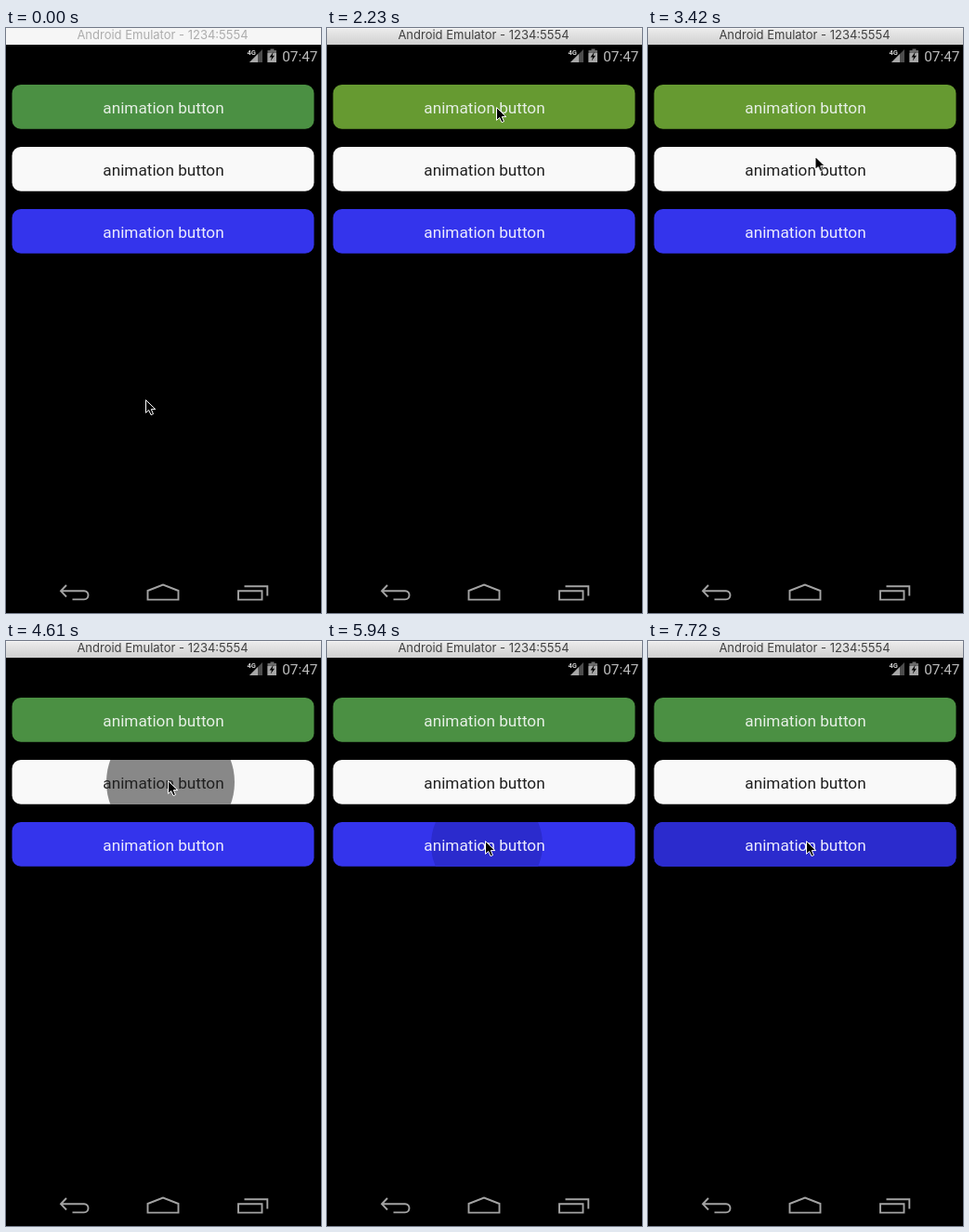
Write an HTML page that moves like this. It is 339 px wide and 630 px high and loops after 8 s.

```html
<!DOCTYPE html>
<html lang="en">
<head>
<meta charset="utf-8">
<title>Animation buttons</title>
<style>
  html, body { margin: 0; width: 100%; height: 100%; overflow: hidden; background: #000; }
  svg { display: block; width: 339px; height: 630px; }
  text { font-family: Roboto, "Noto Sans", sans-serif; }
  .label { font-size: 17.2px; text-anchor: middle; }
  .title { font: 13px Inter, "Open Sans", sans-serif; text-anchor: middle; }
  .clock { font-size: 15.4px; text-anchor: end; fill: #bcbcbc; }
  .net { font-size: 7.5px; font-weight: 700; fill: #d0d0d0; }
  .nav { fill: none; stroke: #a3a3a3; stroke-width: 1.9; }
</style>
</head>
<body>
<svg id="stage" viewBox="0 0 339 630" xmlns="http://www.w3.org/2000/svg">
  <defs>
    <linearGradient id="chrome" x2="0" y2="1">
      <stop offset="0" stop-color="#ebebeb"/>
      <stop offset="1" stop-color="#d0d0d0"/>
    </linearGradient>
  </defs>
  <rect width="339" height="630"/>

  <rect width="339" height="18" fill="#f6f6f6"/>
  <rect id="bar" y="1" width="339" height="17" fill="url(#chrome)"/>
  <text id="title" class="title" x="168.5" y="12">Android Emulator - 1234:5554</text>

  <text class="net" x="259.5" y="29.3">4G</text>
  <path d="M262 37L276 23V37Z" fill="#4c4c4c"/>
  <path d="M262 37L271 28V37Z" fill="#a8a8a8"/>
  <path d="M284.5 22.5h4v1.5h2.5v13h-9.5v-13h3z" fill="#6a6a6a"/>
  <path d="M281.5 27h9.5v10h-9.5z" fill="#a6a6a6"/>
  <path d="M287.8 25.5L283.6 31.4H286L284.8 35.6L289 29.8H286.6Z"/>
  <text class="clock" x="335.5" y="36">07:47</text>

  <g id="buttons"></g>

  <g class="nav">
    <path d="M65 600L59 606.3L65 612.5M59.5 606.3H84C90 606.3 90 615.4 84 615.4H71.5"/>
    <path d="M152.5 615.6V606L169 599.6L185.5 606V615.6Z"/>
    <path d="M250 606.2H275.5V615.6H250ZM256.5 601.2H281.3V611.5"/>
  </g>

  <path id="cursor" d="M.5 .6V14.4L3.7 11.5L6 16.6L8.5 15.6L6.3 10.6H10.8Z"
    stroke="#fff" stroke-width="1" stroke-linejoin="round"/>
</svg>
<script>
const LOOP = 8000;
const byId = id => document.getElementById(id);

const buttons = [
  { id: 'green', y: 61, fill: '#4b9043', ink: '#e6efe5', press: '#268014', cx: 177 },
  { id: 'white', y: 128, fill: '#f9f9f9', ink: '#202020', press: '#888', cx: 177 },
  { id: 'blue', y: 195, fill: '#3434ec', ink: '#ebebfd', press: '#2b2bcd', cx: 172 }
];

byId('buttons').innerHTML = buttons.map(b => `
  <clipPath id="${b.id}Clip"><rect x="6.5" y="${b.y}" width="325" height="47.7" rx="9.5"/></clipPath>
  <g clip-path="url(#${b.id}Clip)">
    <rect id="${b.id}" x="6" y="${b.y}" width="326" height="48" fill="${b.fill}"/>
    <circle id="${b.id}Ripple" cx="${b.cx}" cy="${b.y + 24}" r="0" fill="${b.press}"/>
  </g>
  <text class="label" x="169.5" y="${b.y + 31}" fill="${b.ink}">animation button</text>`).join('');

// Each step [time, value] holds until the next one.
function play(id, steps, style) {
  const frames = steps.map(([t, ...v]) => ({ offset: t / LOOP, easing: 'step-end', ...style(...v) }));
  frames.push({ ...frames[frames.length - 1], offset: 1 });
  byId(id).animate(frames, { duration: LOOP, iterations: Infinity });
}

const fill = c => ({ fill: c });
const fade = o => ({ opacity: o });
const move = (x, y) => ({ transform: `translate(${x}px, ${y}px)` });
const ripple = (r, o = 1) => ({ r: r + 'px', opacity: o });

play('bar', [[0, 0], [1040, 1]], fade);
play('title', [[0, '#adadad'], [1040, '#404040']], fill);

play('cursor', [
  [0, 150, 400], [150, 178, 220], [300, 201, 102], [600, 204, 92], [740, 207, 82],
  [1490, 184, 84], [1630, 176.5, 85], [2230, 182, 85], [2380, 188, 86],
  [3270, 186, 112], [3420, 179.5, 138], [3570, 174, 157], [3710, 174, 150],
  [5350, 173, 176], [5500, 171, 204], [5640, 170, 215]
], move);

const rest = '#4b9043', held = '#268014', glow = '#669a31';
play('green', [
  [0, rest], [1490, '#39882c'], [1630, held],
  [1930, '#368719'], [2080, '#4e9126'], [2230, glow], [2380, '#589539'], [2530, rest], [2670, held],
  [2970, '#368719'], [3120, '#468d22'], [3270, '#56942a'], [3420, glow], [3570, '#589539'], [3710, rest]
], fill);

play('whiteRipple', [
  [0, 0], [4610, 69], [4750, 124], [4900, 180],
  [5200, 180, .75], [5350, 180, .5], [5500, 180, .22], [5640, 0]
], ripple);

play('blueRipple', [
  [0, 0], [5940, 60], [6090, 120], [6240, 180, .9], [6540, 180],
  [6990, 0], [7430, 60], [7580, 120], [7720, 180]
], ripple);
</script>
</body>
</html>
```
